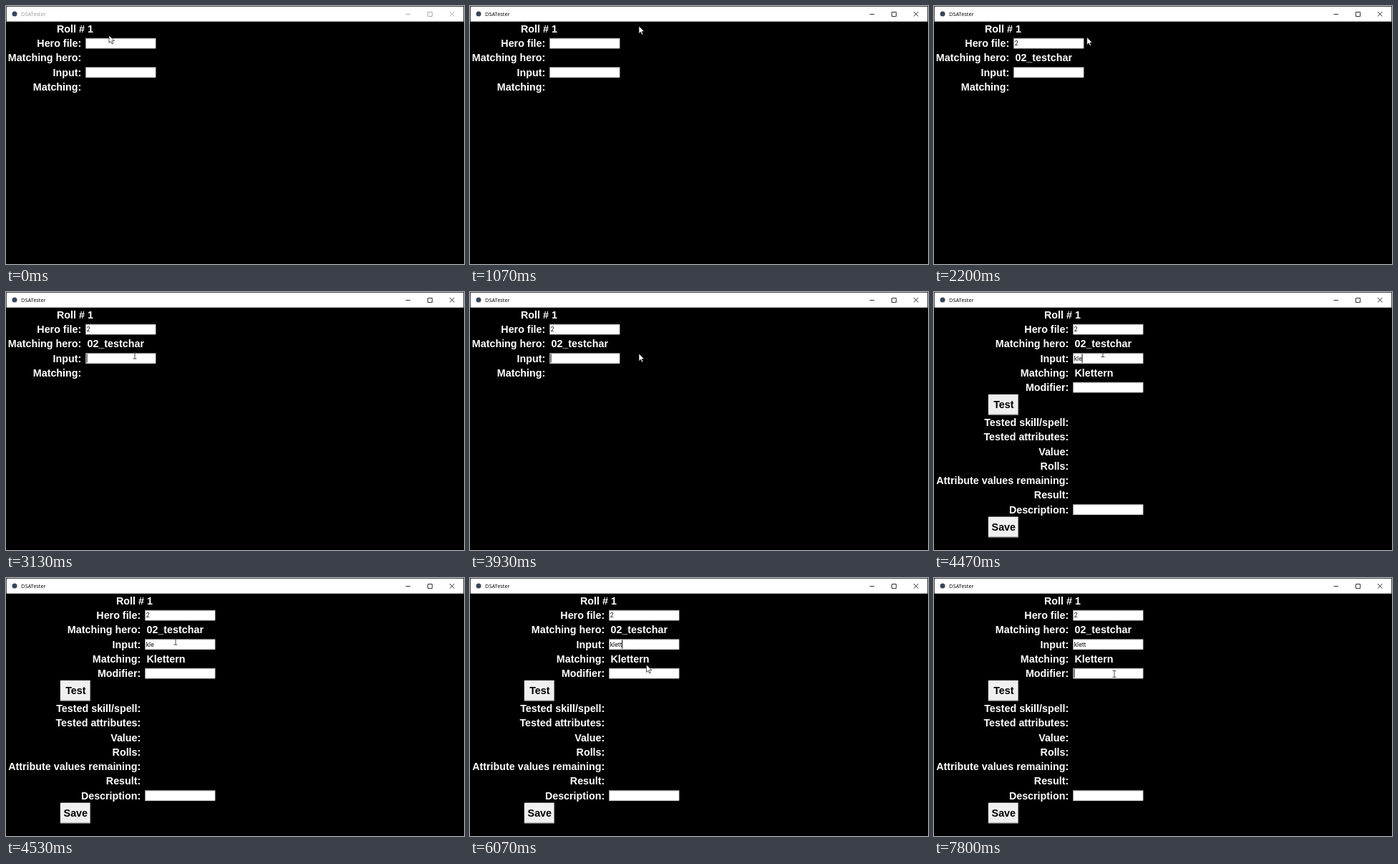
Animation, 640 px wide and 360 px high, one loop 8000 ms. Source, as an HTML page:

```html
<!DOCTYPE html>
<html lang="en">
<head>
<meta charset="utf-8">
<title>DSATester</title>
<style>
  html, body { margin: 0; width: 100%; height: 100%; overflow: hidden; background: #000; }
  svg { display: block; width: 640px; height: 360px; }
  text { font: bold 14.3px "Liberation Sans", Arial, sans-serif; fill: #fff; white-space: pre; }
  .end { text-anchor: end; }
  .mid { text-anchor: middle; }
  .dark { fill: #000; }
  .ui { font: 8.6px Roboto, "Open Sans", sans-serif; fill: #111; }
  #bar .ui { font: 7.4px "Open Sans", "Noto Sans", sans-serif; fill: currentColor; }
</style>
</head>
<body>
<svg id="stage" viewBox="0 0 640 360">
  <rect width="640" height="360"/>
  <g id="bar">
    <rect x=".7" y=".7" width="638.600" height="21" fill="#fff"/>
    <circle cx="12" cy="11" r="3.5" fill="#36465c"/>
    <text class="ui" x="21" y="14">DSATester</text>
    <path d="M558.5 11.5h6.5M589.5 8.5h6v6h-6zM620 8l6.500 6.500M626.500 8l-6.500 6.500"
      fill="none" stroke="currentColor" stroke-width=".8"/>
  </g>
  <g id="form"><g id="more"></g></g>
  <g id="matches"></g>
  <path id="arrow" d="M0 0V10.500L2.500 8.200L4.200 12L5.900 11.200L4.200 7.600H7.500Z"
    fill="#fff" stroke="#111" stroke-width=".7"/>
  <path id="beam" d="M-2.500 -4.500H2.500M0 -4.500V4.500M-2.500 4.500H2.500" fill="none" stroke="#222" stroke-width=".8"/>
</svg>
<script>
const LOOP = 8000, STEP = 200 / 3;
const ENTRY = { x: 111.2, w: 98, h: 14.3 };
const SHIFT = 83;
const $ = id => document.getElementById(id);
const form = $('form'), more = $('more'), matches = $('matches');

function add(parent, tag, attrs, text = '') {
  const el = document.createElementNS('http://www.w3.org/2000/svg', tag);
  for (const k in attrs) el.setAttribute(k, attrs[k]);
  el.textContent = text;
  return parent.appendChild(el);
}
const show = (el, on) => el.setAttribute('visibility', on ? 'inherit' : 'hidden');
const move = (el, x, y) => el.setAttribute('transform', `translate(${x} ${y})`);
const setText = (el, s) => { if (el.textContent !== s) el.textContent = s; };

const label = (parent, s, y) => add(parent, 'text', { class: 'end', x: 105.3, y }, s);
const value = y => add(form, 'text', { x: 113.5, y });

// A box with one colour on its top and left edges, another on the bottom and right.
function bevel(parent, x, y, w, h, fill, light, shade) {
  add(parent, 'rect', { x, y, width: w, height: h, fill });
  const edge = (d, stroke) => add(parent, 'path', { d, stroke, fill: 'none', 'stroke-width': .8 });
  const l = x + .4, t = y + .4, r = x + w - .4, b = y + h - .4;
  edge(`M${l} ${b}V${t}H${r}`, light);
  edge(`M${l} ${b}H${r}V${t}`, shade);
}

function entry(parent, y) {
  const { x, w, h } = ENTRY;
  bevel(parent, x, y, w, h, '#fff', '#8a8a8a', '#e3e3e3');
  const text = add(parent, 'text', { class: 'ui', x: x + 1.5, y: y + 10.4 });
  const caret = add(parent, 'rect', { y: y + 1, width: 1, height: h - 2, fill: '#000' });
  return { y, text, caret };
}

function button(s, y) {
  bevel(more, -7, y, 42, 28.5, '#f0f0f0', '#fff', '#777');
  add(more, 'text', { class: 'mid dark', x: 14.3, y: y + 19.2 }, s);
}

const row = i => 36.8 + 20.25 * i;
add(form, 'text', { x: 71, y: row(0) }, 'Roll # 1');
['Hero file:', 'Matching hero:', 'Input:', 'Matching:'].forEach((s, i) => label(form, s, row(i + 1)));
const heroName = value(row(2)), skill = value(row(4));
const hero = entry(form, 44.9), input = entry(form, 85.4);

label(more, 'Modifier:', row(5));
const modifier = entry(more, 125.9);
button('Test', 143);
['Tested skill/spell:', 'Tested attributes:', 'Value:', 'Rolls:',
 'Attribute values remaining:', 'Result:', 'Description:']
  .forEach((s, i) => label(more, s, 187 + 20.25 * i));
const description = entry(more, 296.4);
button('Save', 313.8);
const entries = [hero, input, modifier, description];

function matchList(cx, lines) {
  const g = add(matches, 'g', {});
  lines.forEach((s, i) => add(g, 'text', { class: 'mid', x: cx, y: 118 + 16.23 * i }, s));
  return g;
}
const lists = {
  k: matchList(202.7, ['21 matches', '', 'Klugheit', 'Fingerfertigkeit', 'Konstitution', 'Körperkraft',
    'Karmaenergie', 'fk', 'Athletik', 'Klettern', 'Körperbeherrschung', 'Sich verstecken',
    'Menschenkenntnis', 'Brett-/Kartenspiel', 'Götter und Kulte', 'Pflanzenkunde']),
  kl: matchList(149, ['2 matches', '', 'Klugheit', 'Klettern'])
};

// Typing: [time, text]
const typed = [[0, ''], [4330, 'k'], [4400, 'kl'], [4470, 'kle'], [4730, 'klet'], [4870, 'klett']];
// Caret visible: [from, to, entry]
const blinks = [
  [470, 1070, hero], [1400, 2000, hero], [2330, 2930, hero],
  [3000, 3600, input], [3930, 4530, input], [4830, 5430, input], [5730, 6330, input],
  [6530, 7130, modifier], [7400, LOOP, modifier]
];
// Pointer: [time, x, y]
const path = [
  [0, 144, 41], [200, 157, 51], [470, 157, 51], [600, 185, 59], [670, 215, 48], [800, 236, 28],
  [2130, 236, 28], [2400, 150, 88], [2600, 150, 88], [2730, 138, 92], [2800, 138, 92],
  [3130, 180, 88.5], [3270, 236, 86], [4470, 236, 86], [4530, 237, 88.5], [4730, 237, 88.5],
  [5000, 256, 108], [5200, 246, 116], [5400, 238, 112], [5530, 244, 106],
  [5870, 244, 106], [6070, 246.5, 121], [6330, 252, 133.8], [LOOP, 252, 133.8]
];

function pointerAt(t) {
  const i = Math.max(1, path.findIndex(p => p[0] >= t));
  const [t0, x0, y0] = path[i - 1], [t1, x1, y1] = path[i];
  const k = (t - t0) / (t1 - t0);
  return [x0 + (x1 - x0) * k, y0 + (y1 - y0) * k];
}

function render(now) {
  const t = Math.round(Math.floor((now % LOOP + 5) / STEP) * STEP / 10) * 10 % LOOP;
  const word = typed.filter(s => s[0] <= t).pop()[1];
  const wide = word.length > 2, dx = wide ? SHIFT : 0;
  const chosen = t >= 1400;

  $('bar').style.color = t < 470 ? '#999' : '#000';
  setText(hero.text, chosen ? '2' : '');
  setText(heroName, chosen ? '02_testchar' : '');
  setText(input.text, word);
  setText(skill, wide ? 'Klettern' : '');
  move(form, dx, 0);
  show(more, wide);
  for (const k in lists) show(lists[k], k === word);

  const blink = blinks.find(b => b[0] <= t && t < b[1]);
  for (const e of entries) {
    const on = !!blink && blink[2] === e;
    show(e.caret, on);
    if (on) e.caret.setAttribute('x', ENTRY.x + 1.3 + e.text.getComputedTextLength());
  }

  const [x, y] = pointerAt(t);
  const left = ENTRY.x + dx;
  const over = x > left && x < left + ENTRY.w &&
    entries.slice(0, wide ? 4 : 2).some(e => y > e.y && y < e.y + ENTRY.h);
  show($('beam'), over);
  show($('arrow'), !over);
  move($(over ? 'beam' : 'arrow'), x, y);
}

const start = performance.now();
function tick() {
  render(performance.now() - start);
  requestAnimationFrame(tick);
}
tick();
</script>
</body>
</html>
```
